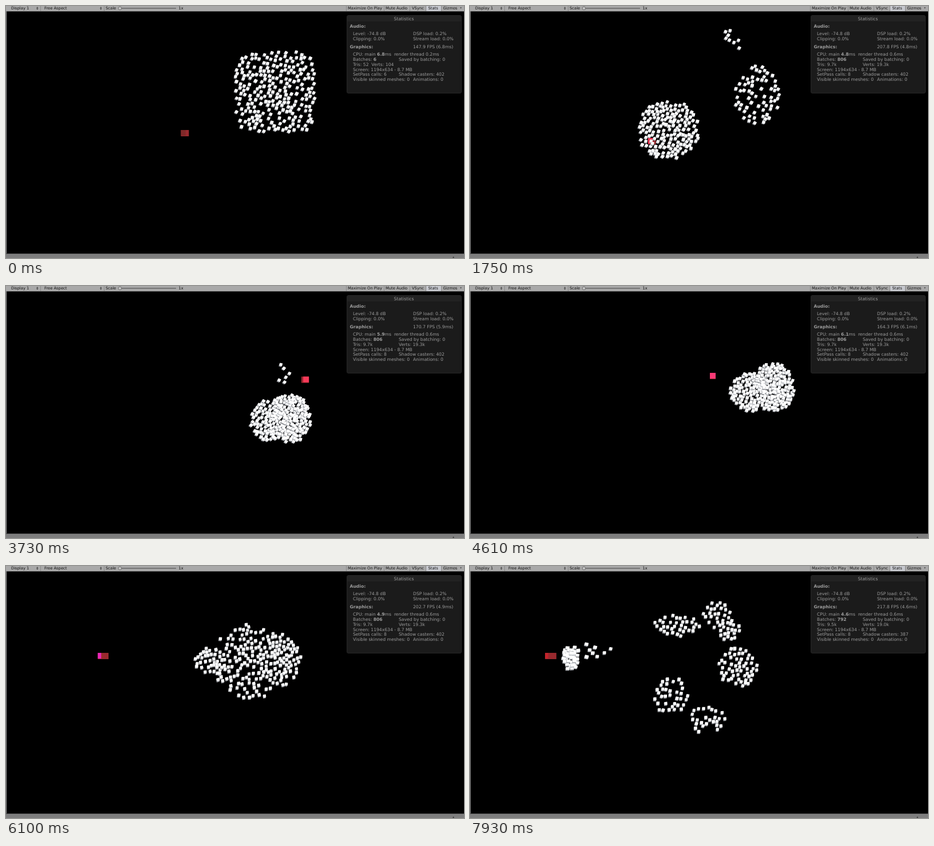
An HTML page with a canvas that plays this animation: 800x441 px, repeating every 8 s.

```html
<!DOCTYPE html>
<html lang="en">
<head>
<meta charset="utf-8">
<title>Flock in a game view</title>
<style>
  html, body { margin: 0; width: 100%; height: 100%; overflow: hidden; background: #000; }
  canvas, svg { position: absolute; left: 0; top: 0; width: 800px; height: 441px; display: block; }
  text { font: 7.65px "DejaVu Sans", sans-serif; white-space: pre; fill: #9c9c9c; }
  .bar text { font-size: 6.75px; fill: #111; }
  .b { font-weight: bold; }
</style>
</head>
<body>
<canvas id="view" width="800" height="441"></canvas>
<svg viewBox="0 0 800 441">
  <g class="bar">
    <rect width="800" height="9" fill="#a9a9a9"/>
    <path d="M0 9.5H800" stroke="#444"/>
    <path d="M60.5 0V9M171.5 0V9M594.5 0V9M660.5 0V9M705.5 0V9M733.5 0V9M760.5 0V9" stroke="#8a8a8a"/>
    <rect x="734" width="26" height="9" fill="#c6c8ce"/>
    <text x="9" y="6.4">Display 1</text>
    <text x="67" y="6.4">Free Aspect</text>
    <text x="174" y="6.4">Scale</text>
    <text x="301.5" y="6.4">1x</text>
    <text x="597" y="6.4">Maximize On Play</text>
    <text x="663" y="6.4">Mute Audio</text>
    <text x="709" y="6.4">VSync</text>
    <text x="737.5" y="6.4">Stats</text>
    <text x="763.5" y="6.4">Gizmos</text>
    <path id="arrows" d="M53 3.4l1.7-2 1.7 2zM53 4.6l1.7 2 1.7-2z" fill="#333"/>
    <use href="#arrows" x="111"/>
    <path d="M793 2.5h3l-1.5 2z" fill="#333"/>
    <path d="M200 4H297" stroke="#666" stroke-width="1.3"/>
    <circle cx="199" cy="4" r="2.8" fill="#c4c4c4" stroke="#555" stroke-width=".7"/>
    <path d="M.5 9V441" stroke="#858585" stroke-width="1.4"/>
    <rect y="433" width="800" height="8" fill="#7e7e7e"/>
    <path d="M0 433.5H800" stroke="#4a4a4a"/>
    <path d="M780 440.5l1.5-2 1.5 2z" fill="#222"/>
  </g>
  <rect x="595.5" y="16.5" width="200" height="136" rx="2.5" fill="#1b1b1b" stroke="#272727"/>
  <rect x="596" y="17" width="199" height="10" fill="#222"/>
  <text x="695" y="25" text-anchor="middle">Statistics</text>
  <text x="600.5" y="38" class="b">Audio:</text>
  <text x="606" y="51">Level: -74.8 dB</text>
  <text x="711" y="51">DSP load: 0.2%</text>
  <text x="606" y="60">Clipping: 0.0%</text>
  <text x="711" y="60">Stream load: 0.0%</text>
  <text x="600.5" y="74" class="b">Graphics:</text>
  <text x="711" y="74" id="fps"></text>
  <text x="606" y="87">CPU: main <tspan class="b" id="ms"></tspan>ms  render thread <tspan id="thread"></tspan>ms</text>
  <text x="606" y="96">Batches: <tspan class="b" id="batches"></tspan></text>
  <text x="686" y="96">Saved by batching: 0</text>
  <text x="606" y="105" id="tris"></text>
  <text x="686" y="105" id="verts"></text>
  <text x="606" y="113.7">Screen: 1194x634 - 8.7 MB</text>
  <text x="606" y="122.4" id="passes"></text>
  <text x="686" y="122.4" id="casters"></text>
  <text x="606" y="131">Visible skinned meshes: 0</text>
  <text x="711" y="131">Animations: 0</text>
</svg>
<script>
const LOOP = 8000, HOLD = 240, STEP = 7690 / 97;
const COUNT = 235, GAP = 6.2, EYE_X = 427;
const ctx = document.getElementById('view').getContext('2d');

let seed = 7;
function random() {
  seed = (seed + 0x6D2B79F5) | 0;
  let r = Math.imul(seed ^ (seed >>> 15), 1 | seed);
  r = (r + Math.imul(r ^ (r >>> 7), 61 | r)) ^ r;
  return ((r ^ (r >>> 14)) >>> 0) / 4294967296;
}

// Random point in a superellipse: power 1 is a diamond, 2 an ellipse, more a box.
function pointIn([cx, cy, rx, ry], power) {
  let x, y;
  do {
    x = random() * 2 - 1;
    y = random() * 2 - 1;
  } while (Math.abs(x) ** power + Math.abs(y) ** power > 0.8 + 0.3 * random());
  return [cx + x * (rx - 2), cy + y * (ry - 2)];
}

// Shares the cubes among the areas by size and density, keeping them apart where there is room.
function scatter(power, areas) {
  const weights = areas.map(([, , rx, ry, density = 1]) => rx * ry * density);
  const total = weights.reduce((a, b) => a + b);
  const points = [];
  let sum = 0;
  areas.forEach((area, i) => {
    sum += weights[i];
    const end = Math.round(COUNT * sum / total);
    while (points.length < end) {
      let p, gap = GAP;
      do {
        p = pointIn(area, power);
        gap *= 0.985;
      } while (points.some(q => Math.hypot(p[0] - q[0], p[1] - q[1]) < gap));
      points.push(p);
    }
  });
  return points;
}

// Swaps goals until no pair of cubes would travel less by trading places.
function matchTo(from, to) {
  for (let sweep = 0, moved = true; moved && sweep < 40; sweep++) {
    moved = false;
    for (let i = 0; i < COUNT; i++) {
      for (let j = 0; j < i; j++) {
        const dot = (from[i][0] - from[j][0]) * (to[i][0] - to[j][0]) +
                    (from[i][1] - from[j][1]) * (to[i][1] - to[j][1]);
        if (dot < -1e-6) { [to[i], to[j]] = [to[j], to[i]]; moved = true; }
      }
    }
  }
}

// Each area is centre, radii and, if not 1, density.
const flock = [];
let previous;
function pose(time, tilt, power, ...areas) {
  const points = scatter(power, areas);
  if (previous) matchTo(previous, points);
  previous = points;
  flock.push([time, tilt, ...points.flat()]);
}

pose(160, 18, 5, [471, 151, 72, 73]);
pose(1030, 22, 2, [388, 197, 50, 35], [393, 157, 37, 29], [463, 67, 20, 20], [514, 117, 34, 23], [517, 180, 30, 40, 0.8]);
pose(1750, 20, 2, [347, 217, 54, 52], [456, 65, 18, 26, 0.3], [500, 155, 42, 54, 0.5]);
pose(2470, 18, 2, [363, 235, 45, 38], [456, 80, 18, 38, 0.15], [487, 172, 32, 36, 0.4], [472, 218, 28, 18, 0.4]);
pose(3730, 24, 2, [464, 235, 38, 37], [495, 232, 39, 43], [486, 160, 13, 32, 0.2]);
pose(4610, 10, 2, [490, 185, 37, 36], [530, 177, 38, 43]);
pose(6100, -4, 1.5, [353, 166, 32, 26, 2], [428, 166, 92, 70], [474, 156, 40, 45]);
pose(7930, 4, 2, [176, 161, 15, 23, 2.5], [208, 152, 45, 20, 0.25], [362, 104, 42, 21], [432, 86, 27, 26],
  [452, 112, 22, 20], [468, 177, 36, 36, 1.1], [351, 227, 33, 34, 0.8], [417, 268, 34, 28, 0.7]);

// time, centre x, y, front hue, front light
const leader = [
  [160, 312.5, 222, 360, 33],
  [1030, 312, 224.5, 350, 52],
  [1750, 318, 236, 350, 58],
  [2470, 431, 245, 350, 58],
  [3730, 522.5, 163.5, 350, 60],
  [4610, 423, 157, 341, 60],
  [5390, 262, 157, 330, 57],
  [6100, 164.5, 157, 315, 53],
  [7000, 136, 157, 335, 48],
  [7930, 141, 157, 357, 45]
];

// Smooth curve through keys whose first entry is the time.
function sample(keys, time) {
  const last = keys.length - 1;
  let k = 0;
  while (k < last - 1 && time >= keys[k + 1][0]) k++;
  const a = keys[k], b = keys[k + 1];
  const before = keys[Math.max(k - 1, 0)], after = keys[Math.min(k + 2, last)];
  const span = b[0] - a[0], u = Math.min(1, Math.max(0, (time - a[0]) / span));
  const ease = u * u * (3 - 2 * u), leave = u * (1 - u) ** 2, arrive = u * u * (u - 1);
  const inRate = 0.7 * span / (b[0] - before[0]), outRate = 0.7 * span / (after[0] - a[0]);
  return a.map((v, i) => v + (b[i] - v) * ease +
    (b[i] - before[i]) * inRate * leave + (after[i] - v) * outRate * arrive);
}

const cubes = Array.from({ length: COUNT }, () => ({
  turn: (random() - 0.5) * 22,
  size: 4.6 + random() * 0.8,
  shade: 130 + Math.floor(random() * 70)
}));

function drawFlock(time) {
  const [, tilt, ...places] = sample(flock, time);
  cubes.forEach(({ turn, size, shade }, i) => {
    const [x, y] = places.slice(i * 2, i * 2 + 2);
    const width = size + Math.max(0, (290 - x) / 70);
    ctx.save();
    ctx.translate(x, y);
    ctx.rotate((tilt + turn) * Math.PI / 180);
    ctx.fillStyle = `rgb(${shade},${shade + 3},${shade + 8})`;
    ctx.fillRect(-width / 2 - 0.7, -size / 2 + 0.7, width, size + 0.5);
    ctx.fillStyle = '#fff';
    ctx.fillRect(-width / 2, -size / 2 - 0.5, width, size);
    ctx.restore();
  });
}

// Away from the eye line the cube widens and shows its inner side.
function drawLeader(time) {
  const [, x, y, hue, light] = sample(leader, time);
  const away = x - EYE_X, width = 10 + Math.abs(away) * 0.034;
  const front = 10 - Math.max(0, -away) * 0.016;
  const left = away < 0 ? x - width / 2 : x + width / 2 - front;
  ctx.fillStyle = 'hsl(357 58% 38%)';
  ctx.fillRect(x - width / 2, y - 5, width, 11);
  ctx.fillStyle = `hsl(${hue} ${light * 1.55}% ${light}%)`;
  ctx.fillRect(left, y - 5, front, 10);
}

// start time, frames per second
const speeds = [[0, 147.9], [240, 200.6], [1500, 207.8], [2900, 170.7], [4100, 164.3], [5000, 202.7], [6800, 217.8]];
const kilo = n => (n / 1000).toFixed(1) + 'k';

function showReadings(time) {
  const idle = time < HOLD;
  const fps = speeds.findLast(([start]) => start <= time)[1];
  const ms = (1000 / fps).toFixed(1);
  const lost = Math.round(Math.max(0, time - 6000) / 1930 * 15);
  const batches = idle ? 6 : 806 - Math.round(lost * 0.95);
  const texts = {
    fps: `${fps.toFixed(1)} FPS (${ms}ms)`,
    ms,
    thread: idle ? '0.2' : '0.6',
    batches,
    tris: idle ? 'Tris: 52  Verts: 104' : `Tris: ${kilo(12 * (batches - 1))}`,
    verts: idle ? '' : `Verts: ${kilo(24 * (batches - 1))}`,
    passes: `SetPass calls: ${idle ? 6 : 8}`,
    casters: `Shadow casters: ${402 - lost}`
  };
  for (const id in texts) document.getElementById(id).textContent = texts[id];
}

function draw() {
  const now = performance.now() % LOOP;
  const time = now < HOLD ? 0 : HOLD + Math.floor((now - HOLD) / STEP + 0.02) * STEP;
  ctx.clearRect(0, 0, 800, 441);
  drawLeader(time);
  drawFlock(time);
  showReadings(time);
  requestAnimationFrame(draw);
}
draw();
</script>
</body>
</html>
```
